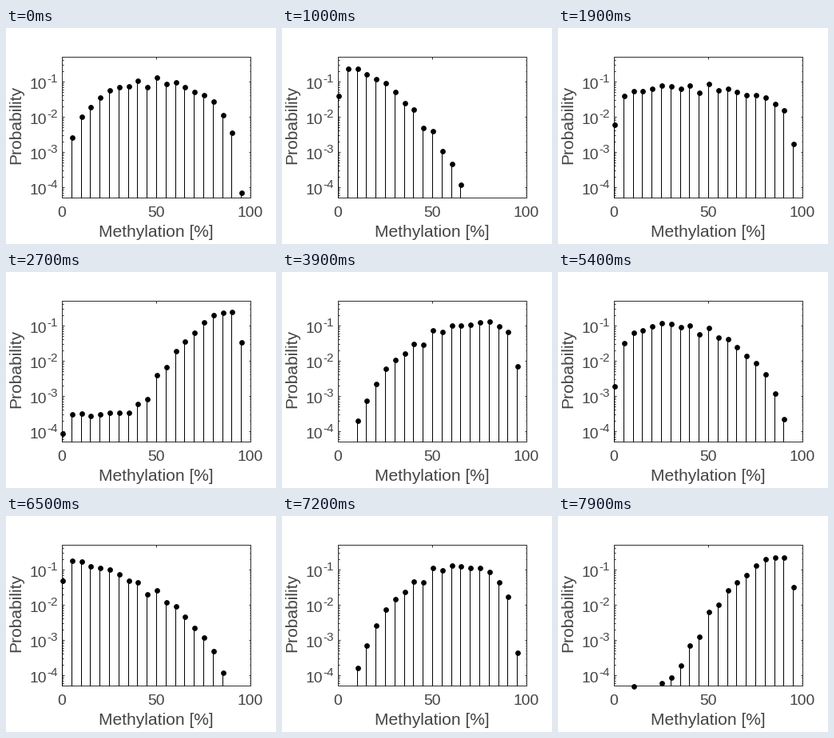
A matplotlib script for the animation above (8 s loop, 338 by 270 pixels).

```python
import numpy as np
import matplotlib.pyplot as plt
from matplotlib.animation import FuncAnimation

W, H, DPI = 338, 270, 64
PX = 72 / DPI                      # points per pixel
LEFT, RIGHT, TOP, BOTTOM = 70, 306, 36, 212
DECADE = (BOTTOM - TOP) / 4        # y axis runs from 5e-5 to 0.5
FRAMES, STEP = 80, 100
INK, TEXT = "#303030", "#444444"

plt.rcParams["font.family"] = "Liberation Sans"


def to_x(v):
    return LEFT + (RIGHT - LEFT) * v / 100


def to_y(p):
    return TOP + DECADE * (np.log10(0.5) - np.log10(p))


# How many fractions k/n fall into each 5 % bin
bins = np.arange(20)
ratio = [20 * k // n for n in range(5, 25) for k in range(1, n)]
count = np.bincount(ratio, minlength=20)
count = count / count.mean()

u = (bins + 0.5) / 20
xs = np.round(to_x(5 * bins))

# time, weight towards 100 %, weight towards 0 %, background
POSES = np.array([
    (0, 2.8, 2.7, 0),
    (1300, 0.3, 11, 0),
    (1900, 0.6, 1.0, 0),
    (2700, 12.5, 1.4, 3e-4),
    (3900, 4.5, 1.3, 0),
    (5400, 1.6, 3.6, 0),
    (6300, 0.2, 8.5, 0),
    (6500, 0.2, 3.9, 0),
    (7900, 11, 1.3, 4.5e-5),
])


def heights(t):
    """Beta-shaped distribution at time t, as pixel rows."""
    a, b, floor = (np.interp(t, POSES[:, 0], col) for col in POSES.T[1:])
    shape = u ** a * (1 - u) ** b
    p = count * (shape / np.sum(count * shape) + floor)
    y = np.round(to_y(p / p.sum()))
    return np.where(y <= BOTTOM, y, np.nan)


fig = plt.figure(figsize=(W / DPI, H / DPI), dpi=DPI, facecolor="white")
ax = fig.add_axes([0, 0, 1, 1])
ax.set_xlim(0, W)
ax.set_ylim(H, 0)
ax.axis("off")


def line(x, y):
    ax.plot(x, y, color=INK, lw=PX, snap=True, solid_capstyle="butt", zorder=2)


def label(x, y, s, size, ha="center", rot=0):
    ax.text(x, y, s, fontsize=size * PX, color=TEXT, ha=ha, va="baseline",
            rotation=rot, rotation_mode="anchor")


def y_tick(p, size):
    y = to_y(p)
    line([LEFT, LEFT + size], [y, y])
    line([RIGHT - size, RIGHT], [y, y])


line([LEFT, RIGHT, RIGHT, LEFT, LEFT], [TOP, TOP, BOTTOM, BOTTOM, TOP])

for v in (0, 50, 100):
    line([to_x(v)] * 2, [BOTTOM - 2.5, BOTTOM])
    line([to_x(v)] * 2, [TOP, TOP + 2.5])
    label(to_x(v), 236.5, str(v), 19.2)

for e in range(-5, 0):
    for m in range(2, 10):
        if 5e-5 < m * 10.0 ** e < 0.5:
            y_tick(m * 10.0 ** e, 1.5)
    if e > -5:
        y = to_y(10.0 ** e)
        y_tick(10.0 ** e, 2.5)
        label(51, y + 9.5, "10", 19.2, ha="right")
        label(65, y + 1, f"-{-e}", 15.2, ha="right")

label((LEFT + RIGHT) / 2 - 0.5, 261, "Methylation [%]", 21)
label(18, 121, "Probability", 21, rot=90)

stems, = ax.plot([], [], color="black", lw=PX, snap=True,
                 solid_capstyle="butt", zorder=3)
dots, = ax.plot([], [], "o", color="black", ms=6.8 * PX, mew=0,
                antialiased=False, zorder=4)


def draw(i):
    y = heights(i * STEP)
    gap = np.full(len(y), np.nan)
    base = np.full(len(y), BOTTOM)
    stems.set_data(np.repeat(xs, 3), np.column_stack([base, y, gap]).ravel())
    dots.set_data(xs + 0.5, y + 0.5)
    return stems, dots


anim = FuncAnimation(fig, draw, frames=FRAMES, interval=STEP,
                     repeat=True, repeat_delay=0, blit=False)
plt.show()
```
